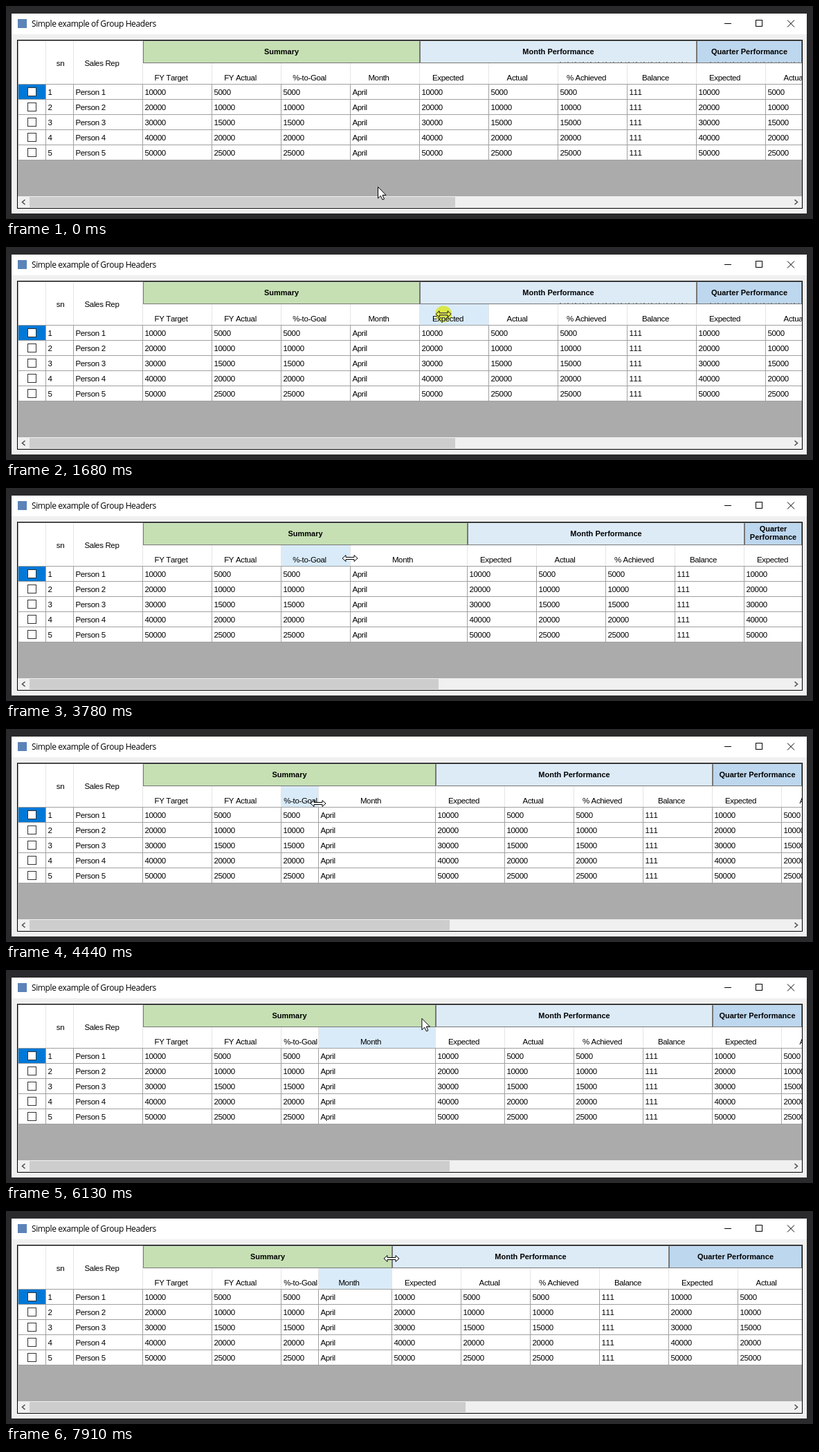
An HTML page with a canvas for the animation above (8 s loop, 1166x309 px).

```html
<!DOCTYPE html>
<html lang="en">
<head>
<meta charset="utf-8">
<title>Group headers</title>
<style>
html, body { margin: 0; width: 1166px; height: 309px; overflow: hidden; }
canvas { display: block; }
</style>
</head>
<body>
<canvas id="stage" width="1166" height="309"></canvas>
<script>
const c = document.getElementById('stage').getContext('2d');
const LOOP = 8000, LEFT = 17, RIGHT = 1150, ROWS = 5;
const HEAD_END = 113, ROW_H = 22, GROUP_H = 33;
const GRID = '#a0a0a0', FAINT = '#e5e5e5';
const PLAIN = { font: '11.5px "Liberation Sans", Arial, sans-serif', spacing: '-0.35px' };
const BOLD = { font: 'bold 11px "Liberation Sans", Arial, sans-serif', spacing: '0px' };
const TITLE = { font: '12px "Open Sans", sans-serif', spacing: '-0.4px' };

const COLUMNS = ['', 'sn', 'Sales Rep', 'FY Target', 'FY Actual', '%-to-Goal', 'Month',
  'Expected', 'Actual', '% Achieved', 'Balance', 'Expected', 'Actual'];
const FIRST_GROUPED = COLUMNS.indexOf('FY Target');
const GROUPS = [
  { label: 'Summary', fill: '#c6e0b4', span: 4 },
  { label: 'Month Performance', fill: '#ddebf7', span: 4 },
  { label: 'Quarter Performance', fill: '#bdd7ee', span: 2 }
];

function cellValue(label, n) {
  switch (label) {
    case '': return '';
    case 'sn': return n;
    case 'Sales Rep': return 'Person ' + n;
    case 'Month': return 'April';
    case 'Balance': return 111;
    case 'FY Target':
    case 'Expected': return n * 10000;
    default: return n * 5000;
  }
}

// The pointer's story: glides and column drags, in order.
const start = { x: 537, y: 262 };
const moves = [], drags = [];

function glide(from, to, x, y) {
  moves.push({ from, to, x, y });
}

function drag(label, change, y, { press, from, to, release }) {
  glide(from, to, moves.at(-1).x + change, y);
  drags.push({ column: COLUMNS.indexOf(label), change, press, release });
}

glide(30, 530, 595, 100);
drag('Month', 69, 95, { press: 910, from: 1500, to: 1950, release: 1950 });
glide(3110, 3780, 497, 102);
drag('%-to-Goal', -46, 108, { press: 3980, from: 4040, to: 4270, release: 4420 });
glide(5090, 5590, 522, 79);
glide(5690, 6480, 633, 66);
glide(6680, 6880, 620, 66);
drag('Month', -63, 69, { press: 7230, from: 7280, to: 7890, release: 7890 });

const clamp = v => Math.max(0, Math.min(1, v));

function pointerAt(t) {
  let { x, y } = start;
  for (const m of moves) {
    const k = 1 - (1 - clamp((t - m.from) / (m.to - m.from))) ** 1.5;
    x += (m.x - x) * k;
    y += (m.y - y) * k;
  }
  return { x, y };
}

function rect(x, y, w, h, color) {
  c.fillStyle = color;
  c.fillRect(x, y, w, h);
}

function frame(x, y, w, h, color) {
  c.strokeStyle = color;
  c.lineWidth = 1;
  c.strokeRect(x + .5, y + .5, w - 1, h - 1);
}

function text(s, x, y, style = PLAIN, align = 'left') {
  c.font = style.font;
  c.letterSpacing = style.spacing;
  c.fontKerning = 'none';
  c.textAlign = align;
  c.fillStyle = '#000';
  c.fillText(s, x, y);
}

function trace(points, x = 0, y = 0) {
  c.beginPath();
  points.forEach(([dx, dy]) => c.lineTo(x + dx, y + dy));
}

function line(points, color, width = 1) {
  trace(points);
  c.strokeStyle = color;
  c.lineWidth = width;
  c.stroke();
}

function drawWindow() {
  rect(0, 0, 1166, 309, '#2a2a2d');
  rect(8, 11, 1149, 290, '#f0f0f0');
  rect(8, 11, 1149, 30, '#fff');
  rect(17, 19, 13, 13, '#5b83b8');
  text('Simple example of Group Headers', 37, 30, TITLE);
  line([[1038, 25.5], [1048, 25.5]], '#000');
  frame(1083, 20, 10, 10, '#000');
  line([[1129, 20.5], [1139, 30.5]], '#000');
  line([[1139, 20.5], [1129, 30.5]], '#000');
  rect(16, 49, 1135, 245, '#000');
  rect(LEFT, 50, 1133, 243, '#ababab');
}

function drawScrollbar(extra) {
  rect(LEFT, 276, 1133, 17, '#f0f0f0');
  rect(34, 277, Math.round(615 * 1700 / (1700 + extra)), 15, '#cdcdcd');
  for (const [x, side] of [[25.5, 1], [1141.5, -1]]) {
    line([[x + 2 * side, 281], [x - 2 * side, 284.5], [x + 2 * side, 288]], '#505050', 1.6);
  }
}

function drawCells(edges, hot) {
  rect(LEFT, 50, 1133, 174, '#fff');
  if (hot >= FIRST_GROUPED) {
    rect(edges[hot] + 1, 83, edges[hot + 1] - edges[hot] - 1, 30, '#d9ebf9');
  }
  rect(18, 114, 39, 21, '#0078d7');
  for (let r = 0; r <= ROWS; r++) rect(LEFT, HEAD_END + r * ROW_H, 1133, 1, GRID);

  COLUMNS.forEach((label, i) => {
    const x = edges[i], end = edges[i + 1];
    rect(end, 50, 1, HEAD_END - 50, FAINT);
    rect(end, HEAD_END, 1, ROWS * ROW_H + 1, GRID);
    // wide columns keep room for a sort arrow
    const shift = end - x < 70 ? 1 : -9;
    text(label, (x + end + 1) / 2 + shift, i < FIRST_GROUPED ? 87 : 108, PLAIN, 'center');
    for (let n = 1; n <= ROWS; n++) text(cellValue(label, n), x + 3.5, 107 + n * ROW_H);
  });

  for (let r = 0; r < ROWS; r++) {
    rect(31, 118 + r * ROW_H, 13, 13, '#fff');
    frame(31, 118 + r * ROW_H, 13, 13, '#333');
  }
  rect(LEFT, 50, 1, 174, GRID);
  rect(LEFT, 50, 1133, 1, GRID);
}

function drawGroups(edges) {
  let column = FIRST_GROUPED;
  for (const { label, fill, span } of GROUPS) {
    const x = edges[column] + 1;
    column += span;
    const end = Math.min(RIGHT, edges[column] + 1), mid = (x + end) / 2;
    rect(x, 50, end - x, GROUP_H, fill);
    frame(x, 50, end - x, GROUP_H, '#777');
    const lines = end - x < 114 ? label.split(' ') : [label];
    lines.forEach((s, i) => text(s, mid, 76 - 6.5 * lines.length + i * 12, BOLD, 'center'));
  }
}

// slivers left over from earlier header painting
function drawRemnants() {
  c.setLineDash([2, 5, 1, 3]);
  line([[800, 81.5], [985, 81.5]], '#888');
  line([[1017, 81.5], [1148, 81.5]], '#888');
  c.setLineDash([]);
}

function drawPointer({ x, y }, resizing) {
  const half = [[-11, 0], [-6, -4.5], [-6, -1.5], [6, -1.5], [6, -4.5], [11, 0]];
  const arrow = [[.5, .5], [.5, 17], [4.3, 13.4], [7, 19], [9.5, 18], [7, 12.3], [12, 12.3]];
  trace(resizing ? [...half, ...half.map(([dx, dy]) => [-dx, -dy])] : arrow, x, y);
  c.closePath();
  c.fillStyle = '#fff';
  c.fill();
  c.strokeStyle = '#000';
  c.lineWidth = 1;
  c.stroke();
}

function drawPress({ x, y }, alpha) {
  c.save();
  c.globalAlpha = alpha;
  c.globalCompositeOperation = 'darken';
  c.beginPath();
  c.arc(x, y, 12, 0, 2 * Math.PI);
  c.fillStyle = '#ece846';
  c.fill();
  c.restore();
}

function draw(t) {
  const widths = COLUMNS.map((_, i) => i < 2 ? 40 : 100);
  let extra = 0, press = 0;
  for (const d of drags) {
    if (t >= d.release) {
      widths[d.column] += d.change;
      extra += d.change;
    } else if (t >= d.press) {
      press = clamp((t - d.press + 15) / 50);
    }
  }
  const edges = [LEFT];
  widths.forEach((w, i) => edges.push(edges[i] + w));

  const pointer = pointerAt(t);
  const inHeader = pointer.y < HEAD_END;
  const hot = inHeader ? edges.findIndex(e => e >= pointer.x) - 1 : -1;
  const nearEdge = inHeader && edges.some(e => Math.abs(e - pointer.x) < 4);

  drawWindow();
  c.save();
  c.beginPath();
  c.rect(LEFT, 50, RIGHT - LEFT, 243);
  c.clip();
  drawCells(edges, hot);
  drawGroups(edges);
  if (t < drags[0].release) drawRemnants();
  drawScrollbar(extra);
  c.restore();
  drawPointer(pointer, press > 0 || nearEdge);
  if (press) drawPress(pointer, press);
}

const began = performance.now();
function tick() {
  draw((performance.now() - began) % LOOP);
  requestAnimationFrame(tick);
}
tick();
</script>
</body>
</html>
```
